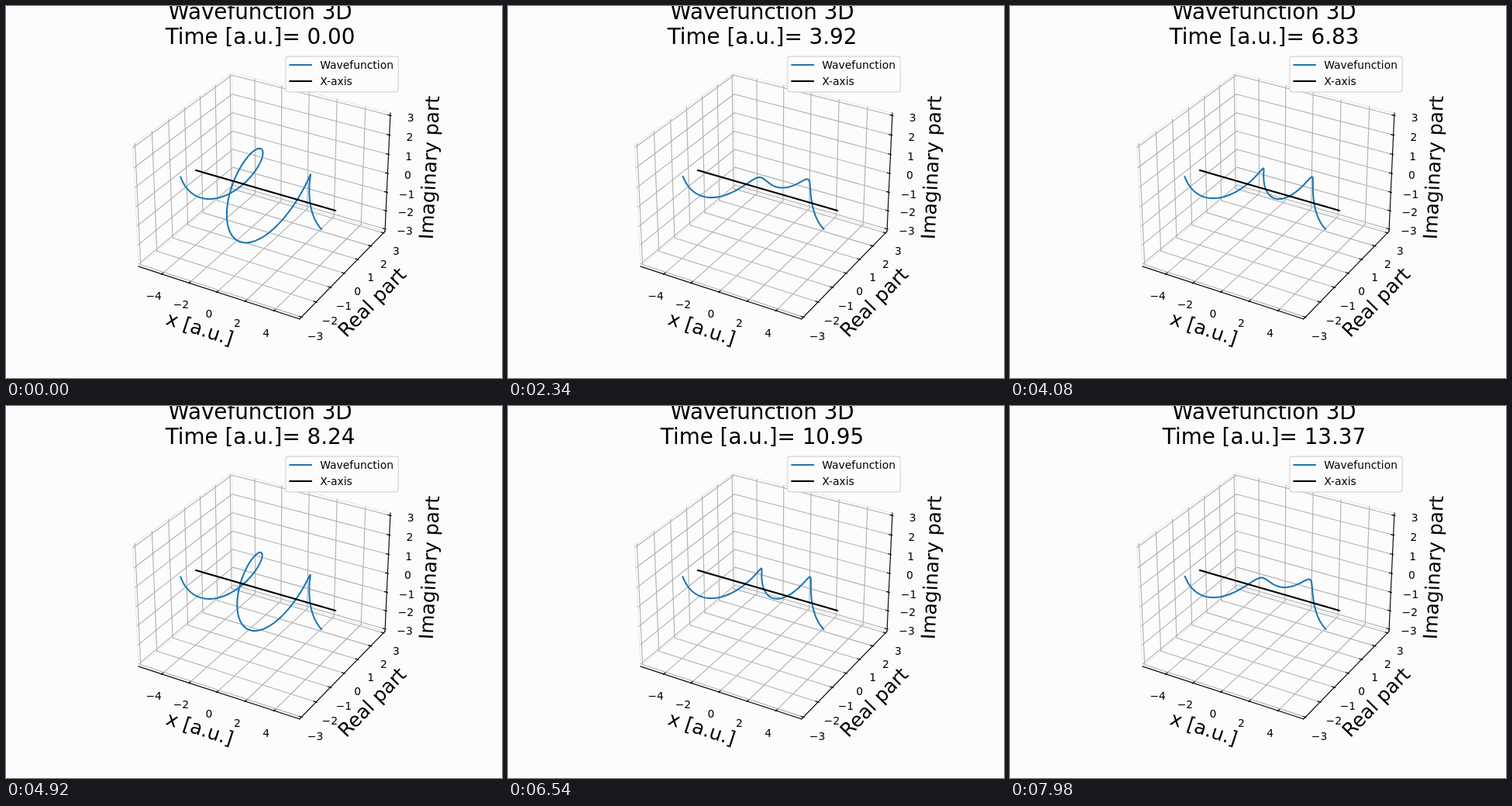
These frames come from a looping animation (640 px wide and 480 px high, 8 s). An HTML page:

```html
<!DOCTYPE html>
<html lang="en">
<head>
<meta charset="utf-8">
<title>Wavefunction 3D</title>
<style>
  html, body { margin: 0; width: 100%; height: 100%; overflow: hidden; background: #fcfcfc; }
  svg { display: block; width: 640px; height: 480px; }
  text { font: 13.89px "DejaVu Sans", Verdana, sans-serif; text-anchor: middle; }
  .title { font-size: 27.78px; }
  .label { font-size: 25px; }
  .legend text { text-anchor: start; }
  polyline, line { fill: none; stroke-linejoin: round; }
  .pane { stroke: #ebebeb; stroke-width: 1.2; }
  .grid { stroke: #b0b0b0; stroke-width: 1.11; }
  .axis { stroke: #000; stroke-width: 1.11; stroke-linecap: square; }
  .tick { stroke: #000; stroke-width: 1.11; }
  .wave { stroke: #1f77b4; stroke-width: 2.08; stroke-linecap: square; }
  .centre { stroke: #000; stroke-width: 2.08; stroke-linecap: square; }
</style>
</head>
<body>
<svg id="stage" viewBox="0 0 640 480"></svg>
<script>
const stage = document.getElementById('stage');
const LOOP = 8000, STEP = 60, TIME_STEP = 20 / 199;
const SIZE = [8 / 7, 8 / 7, 6 / 7];     // box edges along x, Re, Im
const LIMIT = [5.5, 3, 3];
const EDGE = SIZE.map(s => s * 25 / 48); // panes sit slightly outside the limits

function add(tag, attrs, text = '', parent = stage) {
  const node = document.createElementNS('http://www.w3.org/2000/svg', tag);
  for (const key in attrs) node.setAttribute(key, attrs[key]);
  node.textContent = text;
  return parent.appendChild(node);
}

// Perspective camera: elevation 30°, azimuth -60°, distance 10.
function project([x, y, z]) {
  const c = Math.sqrt(3) / 2;
  const depth = 10 - (c / 2 * x - 0.75 * y + 0.5 * z);
  const right = (c * x + 0.5 * y) / depth;
  const up = (-0.25 * x + c / 2 * y + c * z) / depth;
  const scale = 369.6 / 0.185;
  return [143.2 + (right + 0.095) * scale, 427.2 - (up + 0.095) * scale];
}

const world = (value, axis) => value / LIMIT[axis] * SIZE[axis] / 2;
const toPoints = list => list.map(p => project(p).map(v => v.toFixed(2)).join()).join(' ');
const draw = (cls, ...list) => add('polyline', { class: cls, points: toPoints(list) });

// side: which edge of the box each axis runs along; wall: where the panes stand
const [ex, ey, ez] = EDGE;
const wall = [-ex, ey, -ez];
const axes = [
  { name: 'x [a.u.]', ticks: [-4, -2, 0, 2, 4], side: [0, -1, -1], tickDir: 1 },
  { name: 'Real part', ticks: [-3, -2, -1, 0, 1, 2, 3], side: [1, 0, -1], tickDir: 0 },
  { name: 'Imaginary part', ticks: [-3, -2, -1, 0, 1, 2, 3], side: [1, 1, 0], tickDir: 0 },
];

function set(point, axis, value) {
  const copy = [...point];
  copy[axis] = value;
  return copy;
}

draw('pane', [-ex, -ey, -ez], [-ex, ey, -ez], [-ex, ey, ez], [-ex, -ey, ez], [-ex, -ey, -ez]);
draw('pane', [-ex, ey, -ez], [ex, ey, -ez], [ex, ey, ez], [-ex, ey, ez]);
draw('pane', [-ex, -ey, -ez], [ex, -ey, -ez], [ex, ey, -ez]);

axes.forEach(({ ticks }, axis) => {
  const [a, b] = [0, 1, 2].filter(i => i !== axis);
  for (const tick of ticks) {
    const corner = set(wall, axis, world(tick, axis));
    draw('grid', set(corner, a, -wall[a]), corner, set(corner, b, -wall[b]));
  }
});

axes.forEach(({ name, ticks, side, tickDir }, axis) => {
  const spine = side.map((s, i) => s * EDGE[i]);
  const outward = amount => side.map((s, i) => s * (EDGE[i] + amount * SIZE[i]));
  const ends = [set(spine, axis, -EDGE[axis]), set(spine, axis, EDGE[axis])];
  draw('axis', ...ends);

  for (const tick of ticks) {
    const at = world(tick, axis), base = set(spine, axis, at);
    const reach = k => set(base, tickDir, spine[tickDir] + side[tickDir] * k * SIZE[tickDir] / 12);
    draw('tick', reach(0.1), reach(-0.2));
    const [x, y] = project(set(outward(0.0864), axis, at));
    add('text', { x, y: Math.round(y + 10.8) }, String(tick).replace('-', '−'));
  }

  const [[x1, y1], [x2, y2]] = ends.map(project);
  const angle = Math.atan2(y2 - y1, x2 - x1) * 180 / Math.PI;
  const [x, y] = project(outward(0.1879));
  add('text', { class: 'label', y: 6.5, transform: `translate(${x} ${y}) rotate(${angle})` }, name);
});

const wave = draw('wave');
draw('centre', [world(-5, 0), 0, 0], [world(5, 0), 0, 0]);

const legend = add('g', { class: 'legend' });
add('rect', { x: 360.8, y: 65.2, width: 145.4, height: 45.6, rx: 2.8,
  fill: '#fcfcfc', stroke: '#d6d6d6', 'stroke-width': 1.2 }, '', legend);
[['wave', 'Wavefunction', 76], ['centre', 'X-axis', 97]].forEach(([cls, text, y]) => {
  add('line', { class: cls, x1: 366.4, x2: 393.8, y1: y, y2: y }, '', legend);
  add('text', { x: 405.2, y: y + 5 }, text, legend);
});

add('text', { class: 'title', x: 328, y: 17 }, 'Wavefunction 3D');
const clock = add('text', { class: 'title', x: 328, y: 49 });

// Akhmediev breather: localised along x, periodic in time, on the background e^(ix).
function breather(x, t) {
  const c = Math.SQRT1_2 * Math.cos(Math.SQRT1_2 * t);
  const s = Math.sinh(x), d = c - Math.cosh(x);
  const re = (c * Math.cos(x) - s * Math.sin(x)) / d;
  const im = (c * Math.sin(x) + s * Math.cos(x)) / d;
  return [world(x, 0), world(re, 1), world(im, 2)];
}

const samples = Array.from({ length: 301 }, (_, i) => -5 + i / 30);

function render() {
  const t = Math.floor(performance.now() % LOOP / STEP) * TIME_STEP;
  wave.setAttribute('points', toPoints(samples.map(x => breather(x, t))));
  clock.textContent = `Time [a.u.]= ${t.toFixed(2)}`;
  requestAnimationFrame(render);
}
render();
</script>
</body>
</html>
```
